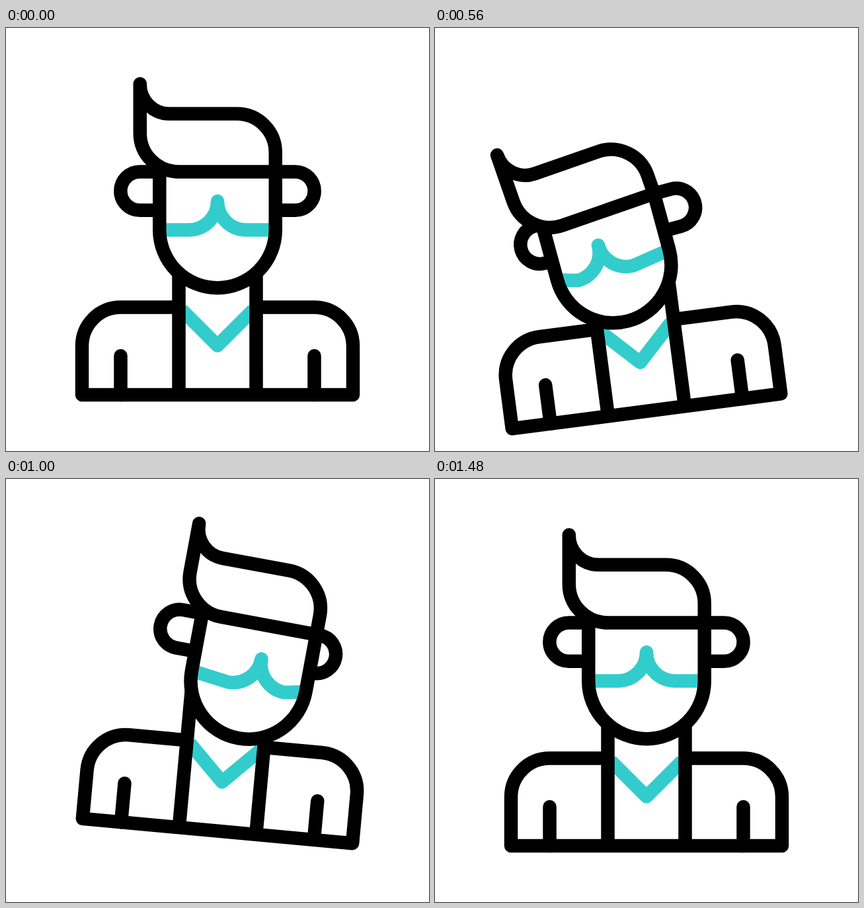
Animation, 640 px wide and 640 px high, one loop 1700 ms. Source, as an HTML page:

```html
<!DOCTYPE html>
<html lang="en">
<head>
<meta charset="utf-8">
<title>Swaying man</title>
<style>
  html, body { margin: 0; height: 100%; overflow: hidden; background: #fff; }
  svg { display: block; width: 100vw; height: 100vh; }
  path { fill: none; stroke: #000; stroke-width: 20.5; stroke-linejoin: round; }
  .solid { fill: #fff; }
  .teal { stroke: #3cc; }
  .round { stroke-linecap: round; }
</style>
</head>
<body>
<svg viewBox="0 0 640 640">
  <!-- origin: middle of the hem -->
  <g id="body">
    <path class="teal" d="M-54-128.5 0-74.5 54-128.5"/>
    <path d="M-58.5-132.5H-146.5A58.5 58.5 0 0 0-205-74V0H205V-74A58.5 58.5 0 0 0 146.5-132.5H58.5M-58.5 0V-220M58.5 0V-220"/>
    <path class="round" d="M-146.5-59V0M146.5-59V0"/>
  </g>
  <!-- origin: centre of the jaw -->
  <g id="head">
    <path id="leftEar" d="M-87.75-88H-117.5A29.15 29.15 0 0 0-117.5-29.7H-87.75"/>
    <path id="rightEar" d="M87.75-88H117.5A29.15 29.15 0 0 1 117.5-29.7H87.75"/>
    <path class="solid" style="stroke:none" d="M-87.75-88V0A87.75 87.75 0 0 0 87.75 0V-88Z"/>
    <path class="teal" id="glasses"/>
    <path d="M-87.75-88V0A87.75 87.75 0 0 0 87.75 0V-88"/>
    <path class="solid" id="hair" d="M-117.25-221V-146.5A58.5 58.5 0 0 0-58.75-88H87.75V-117.25A58.5 58.5 0 0 0 29.25-175.75H-73A44.5 44.5 0 0 1-117.25-221Z"/>
  </g>
</svg>
<script>
const LOOP = 1700, END = 1480;
const $ = id => document.getElementById(id);
const place = (id, transform) => $(id).setAttribute('transform', transform);

// Cubic bezier easing with flat ends; x1 and x2 are the handle lengths.
function ease(x, x1, x2) {
  let lo = 0, hi = 1, u;
  for (let i = 0; i < 24; i++) {
    u = (lo + hi) / 2;
    const v = 1 - u;
    if (3 * x1 * u * v * v + 3 * x2 * u * u * v + u * u * u < x) lo = u; else hi = u;
  }
  return u * u * (3 - 2 * u);
}

// Keys: [time, value, handles of the ease leading to it]
function track(t, keys) {
  for (let i = 1; i < keys.length; i++) {
    const [t0, v0] = keys[i - 1], [t1, v1, x1 = 1 / 3, x2 = 2 / 3] = keys[i];
    if (t < t1) return v0 + (v1 - v0) * ease((t - t0) / (t1 - t0), x1, x2);
  }
  return keys[keys.length - 1][1];
}

// Rest, full left lean, full right lean, rest
const sway = (t, leftAt, rightAt, start, finish) => (left, right) =>
  track(t, [[0, 0], [leftAt, left, start], [rightAt, right], [END, 0, 1 / 3, 1 - finish]]);

function draw(t) {
  const turn = sway(t, 450, 1040, .46, .62)(-8.7, 5.4);
  const lift = sway(t, 450, 1040, .33, .58)(29.7, -23.1);
  place('body', `translate(320 ${555 + lift}) rotate(${turn})`);

  const head = sway(t, 440, 1007, .4, .54);
  const drop = track(t, [[0, 0], [440, 60, .49], [1007, .4], [1130, -5.2], [END, 0]]);
  place('head', `translate(${320 + head(-63.3, 47.3)} ${305.5 + drop}) rotate(${head(-18.6, 10.5)})`);
  place('hair', `rotate(${head(-4.5, 0)} 87.75 -88)`);
  place('leftEar', `translate(${head(20.7, 0)} 0)`);
  place('rightEar', `translate(${head(0, -24)} 0)`);

  const x = head(-17.7, 12.8), y = head(9, 7);
  $('glasses').setAttribute('d', `M-87.75 0L${x - 43.5} ${y}a43.5 43.5 0 0 0 43.5-43.5a43.5 43.5 0 0 0 43.5 43.5L87.75 0`);
}

function tick() {
  draw(performance.now() % LOOP);
  requestAnimationFrame(tick);
}
tick();
</script>
</body>
</html>
```
